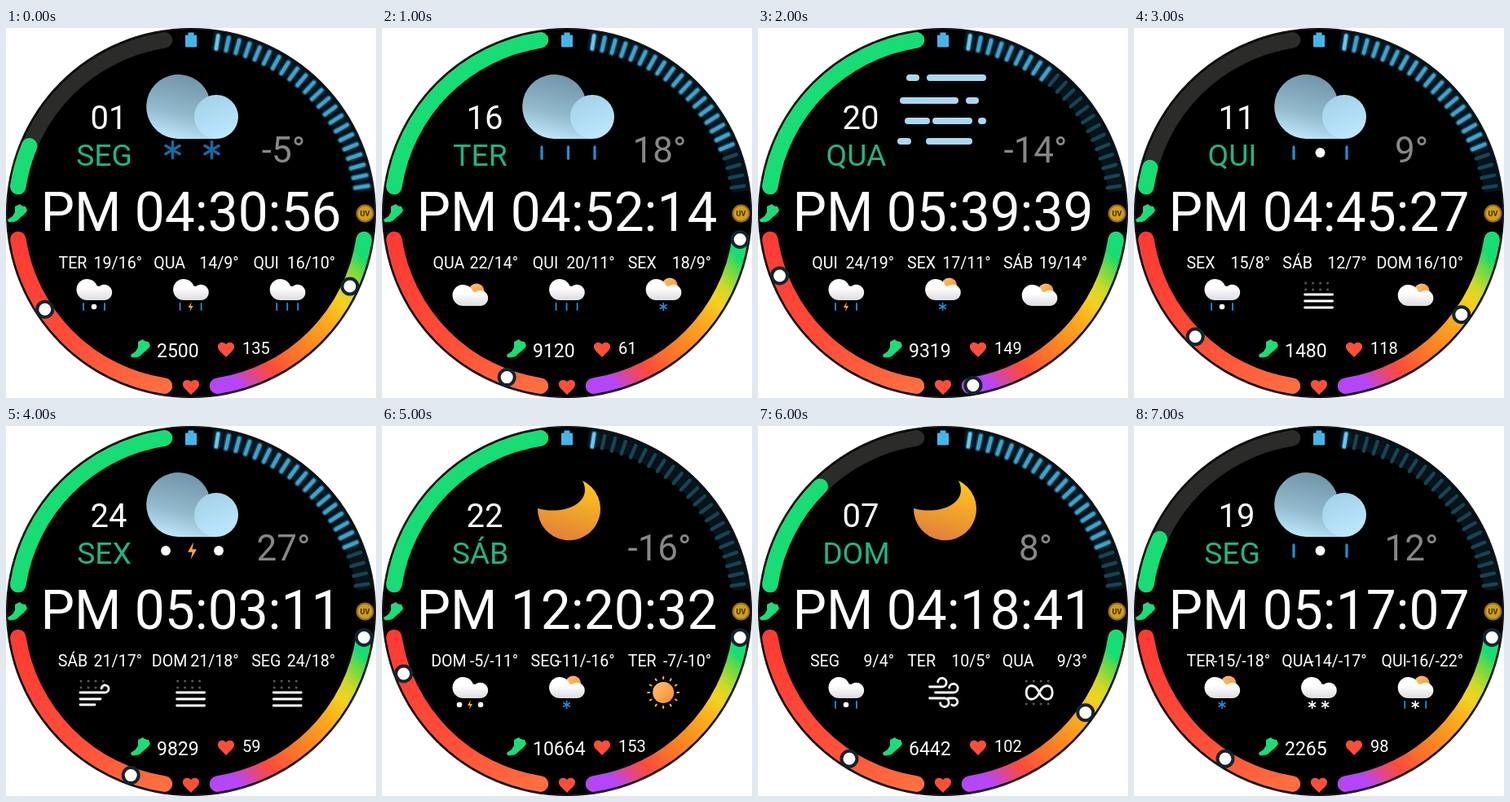
These frames come from a looping animation (454 by 454 pixels, 8 s). An HTML page:

```html
<!DOCTYPE html>
<html lang="pt">
<head>
<meta charset="utf-8">
<style>
  html, body { margin: 0; width: 100%; height: 100%; overflow: hidden; background: #fff; }
  svg { display: block; width: 454px; height: 454px; font-family: Roboto, sans-serif; fill: #fff; }
</style>
</head>
<body>
<svg viewBox="0 0 454 454">
  <defs>
    <linearGradient id="pulse" gradientUnits="userSpaceOnUse" x1="14" y1="259" x2="195" y2="440">
      <stop stop-color="#ff3b33"/><stop offset=".5" stop-color="#ff4c37"/><stop offset="1" stop-color="#ff6f40"/>
    </linearGradient>
    <linearGradient id="uv" gradientUnits="userSpaceOnUse" x1="440" y1="259" x2="259" y2="440">
      <stop offset=".07" stop-color="#16dd74"/><stop offset=".12" stop-color="#5fda48"/>
      <stop offset=".22" stop-color="#d0d928"/><stop offset=".29" stop-color="#f2d21f"/>
      <stop offset=".37" stop-color="#fdb41c"/><stop offset=".52" stop-color="#fa8f21"/>
      <stop offset=".66" stop-color="#fb6a2c"/><stop offset=".76" stop-color="#fb4b3c"/>
      <stop offset=".84" stop-color="#e0468a"/><stop offset=".92" stop-color="#b446f8"/>
    </linearGradient>
    <linearGradient id="cloudBack" x1=".6" y1="0" x2=".35" y2="1">
      <stop stop-color="#7093a8"/><stop offset=".6" stop-color="#92b9cd"/><stop offset="1" stop-color="#bfe8fb"/>
    </linearGradient>
    <linearGradient id="cloudFront" x1=".2" y1="0" x2=".6" y2="1">
      <stop stop-color="#a2d0e6"/><stop offset="1" stop-color="#bce8ff"/>
    </linearGradient>
    <linearGradient id="moon" x1=".7" y1="0" x2=".4" y2="1">
      <stop stop-color="#ffc51c"/><stop offset="1" stop-color="#e0803a"/>
    </linearGradient>
    <linearGradient id="puff" x1="0" y1="0" x2="0" y2="1">
      <stop offset=".4" stop-color="#fff"/><stop offset="1" stop-color="#dcdce3"/>
    </linearGradient>
    <linearGradient id="sun" x1="0" y1="0" x2="1" y2="1">
      <stop stop-color="#ffc56b"/><stop offset="1" stop-color="#f58a35"/>
    </linearGradient>
    <path id="heart" fill="#ff4f38" d="M0 10L-8 2C-14-5-6-12 0-6C6-12 14-5 8 2Z"/>
    <path id="shoe" fill="#1ade78" d="M-12 8L-6 4L-3-1V-8L3-11Q5-8 10-8L12-3C9 2 5 4 1 8Q-3 12-11 11Z"/>
  </defs>
  <circle cx="227" cy="227" r="227" fill="#000"/>
  <circle cx="227" cy="227" r="226" fill="none" stroke="#222"/>
  <g id="face"></g>
</svg>
<script>
const DAYS = ['DOM', 'SEG', 'TER', 'QUA', 'QUI', 'SEX', 'SÁB'];
const GREEN = '#17dd74', BLUE = '#208fd8';
const START = 8.7, END = 81.3, RADIUS = 214.7, TICKS = 22;

// Angles are degrees away from the horizontal axis; precip: l line, . dot, b bolt, s/w snow
const states = [
  {day: 1, date: '01', temp: -5, time: '04:30:56', sky: 'cloud ss', temps: '19/16 14/9 16/10',
   icons: ['cloud l.l', 'cloud lbl', 'cloud lll'], steps: 2500, pulse: 135, goal: 22.5, battery: 22, heart: 33.4, uv: 24.8},
  {day: 2, date: '16', temp: 18, time: '04:52:14', sky: 'cloud lll', temps: '22/14 20/11 18/9',
   icons: ['sunny', 'cloud lll', 'sunny s'], steps: 9120, pulse: 61, goal: END, battery: 18, heart: 69.9, uv: START},
  {day: 3, date: '20', temp: -14, time: '05:39:39', sky: 'fog', temps: '24/19 17/11 19/14',
   icons: ['cloud lbl', 'sunny s', 'sunny'], steps: 9319, pulse: 149, goal: END, battery: 9, heart: 21, uv: 80.1},
  {day: 4, date: '11', temp: 9, time: '04:45:27', sky: 'cloud l.l', temps: '15/8 12/7 16/10',
   icons: ['cloud l.l', 'mist', 'sunny'], steps: 1480, pulse: 118, goal: 15, battery: 18, heart: 45, uv: 35.5},
  {day: 5, date: '24', temp: 27, time: '05:03:11', sky: 'cloud .b.', temps: '21/17 21/18 24/18',
   icons: ['breeze', 'mist', 'mist'], steps: 9829, pulse: 59, goal: END, battery: 18, heart: 69.9, uv: START},
  {day: 6, date: '22', temp: -16, time: '12:20:32', sky: 'moon', temps: '-5/-11 -11/-16 -7/-10',
   icons: ['cloud .b.', 'sunny s', 'sun'], steps: 10664, pulse: 153, goal: END, battery: 1, heart: 21, uv: START},
  {day: 0, date: '07', temp: 8, time: '04:18:41', sky: 'moon', temps: '9/4 10/5 9/3',
   icons: ['cloud l.l', 'wind', 'haze'], steps: 6442, pulse: 102, goal: 45.4, battery: 18, heart: 57.6, uv: 35.5},
  {day: 1, date: '19', temp: 12, time: '05:17:07', sky: 'cloud l.l', temps: '-15/-18 -14/-17 -16/-22',
   icons: ['sunny s', 'cloud ww', 'sunny lwl'], steps: 2265, pulse: 98, goal: 24.3, battery: 1, heart: 57.6, uv: START},
];

const text = (s, x, y, size, anchor = 'middle', fill = '#fff') =>
  `<text x="${x}" y="${y}" font-size="${size}" text-anchor="${anchor}" fill="${fill}">${s}</text>`;
const circle = (x, y, r, fill = '#fff', extra = '') => `<circle cx="${x}" cy="${y}" r="${r}" fill="${fill}" ${extra}/>`;
const line = (d, color, width) =>
  `<path d="${d}" fill="none" stroke="${color}" stroke-width="${width}" stroke-linecap="round"/>`;
const group = (x, y, body, scale = 1) => `<g transform="translate(${x} ${y}) scale(${scale})">${body}</g>`;
const use = (id, x, y) => `<use href="#${id}" x="${x}" y="${y}"/>`;
const polar = (deg, r = RADIUS) => {
  const a = deg * Math.PI / 180;
  return [227 + r * Math.cos(a), 227 + r * Math.sin(a)];
};
const arcPath = (from, to) => `M${polar(from)}A${RADIUS} ${RADIUS} 0 0 1 ${polar(to)}`;
const arc = (from, to, color) => line(arcPath(from, to), color, 19.5);
const marker = deg => circle(...polar(deg), 9.5, '#fff', 'stroke="#14232e" stroke-width="4"');

function battery(level) {
  let out = `<path d="${arcPath(-83, -7)}" fill="none" stroke="#05131a" stroke-width="21"/>`;
  for (let i = 0; i < TICKS; i++) {
    const a = -END + i * (END - START) / (TICKS - 1);
    const d = `M${polar(a, 204)}L${polar(a, 220)}`;
    if (i < level) out += line(d, '#10465e', 7.5);
    out += line(d, i < level ? (i ? '#3fa3ca' : '#62caf2') : '#1a4352', 4.5);
  }
  return out + '<path fill="#45b5e8" d="M223.5 5.5h7v3h2.5q1 0 1 1v13q0 1-1 1h-12q-1 0-1-1v-13q0-1 1-1h2.5z"/>';
}

const flake = color => [0, 60, 120].map(a =>
  `<g transform="rotate(${a})">${line('M0-4.5V4.5', color, 1.6)}</g>`).join('');
const drops = {
  l: line('M0-4V4', BLUE, 1.8),
  '.': circle(0, 0, 3.3),
  b: '<path fill="#ffab2e" d="M1-6L-3 1H0L-1 6L3-1H0Z"/>',
  s: flake(BLUE),
  w: flake('#fff'),
};
const precip = (kinds = '', x, y, gap, scale) => [...kinds].map((k, i) =>
  group(x + (i - (kinds.length - 1) / 2) * gap, y, drops[k], scale)).join('');

const bars = (y, ...spans) => spans.map(([a, b]) => line(`M${a + 4} ${y}H${b - 4}`, '#a9d8f2', 8)).join('');
function sky(name) {
  const [kind, kinds] = name.split(' ');
  if (kind == 'moon')
    return '<path fill="url(#moon)" d="M246 67A38.5 38.5 0 1 1 191 101C222 110 260 95 246 67Z"/>';
  if (kind == 'fog')
    return bars(61, [182, 198], [207, 280]) + bars(89, [174, 246], [255, 271]) +
      bars(114, [180, 211], [214, 263], [270, 280]) + bars(139, [171, 188], [206, 263]);
  const pair = kinds.length == 2;
  return '<path fill="url(#cloudBack)" d="M258 136H212A39.5 39.5 0 1 1 248 81Z"/>' +
    circle(258, 109, 27, 'url(#cloudFront)') +
    `<g opacity="${pair ? .75 : 1}">${precip(kinds, 228.5, pair ? 149.5 : 153, pair ? 48 : 32.5, pair ? 2.2 : 1.8)}</g>`;
}

const puff = '<path fill="url(#puff)" d="M12.5 7H-8.5A13 13 0 1 1 3.7-10.5L6.5-10A9.6 9.6 0 1 1 12.5 7Z"/>';
const dots = y => [-16, -7, 2, 11].map(x => circle(x, y, 1.5, '#5a5a5a')).join('');
const white = d => line(d, '#fff', 2.8);
const icons = {
  cloud: puff,
  sunny: circle(8, -11, 9.5, 'url(#sun)') + puff,
  sun: circle(0, 0, 13, 'url(#sun)') + Array.from({length: 12}, (_, i) =>
    `<g transform="rotate(${i * 30})">${line('M0-17V-19', '#ffb45a', 2)}</g>`).join(''),
  mist: dots(-14) + dots(-6) + white('M-17 0H17M-17 8H17M-17 16H17'),
  breeze: dots(-14) + dots(-6) + white('M-17 0H13A4.5 4.5 0 1 0 9-5M-17 8H8M-17 15H1'),
  wind: white('M-16-7H-1A5.3 5.3 0 1 0-6-13M-9 0H13A5.3 5.3 0 1 0 8-6M-16 7H2A5.3 5.3 0 1 1-3 13M7 7H13A4.5 4.5 0 1 1 11 15'),
  haze: dots(-14) + dots(14) + white('M0 0C-5-11-16-11-16 0S-5 11 0 0S16-11 16 0S5 11 0 0'),
};
function icon(name, x) {
  const [kind, kinds] = name.split(' ');
  const alone = name == 'sunny';
  return group(x, alone ? 334 : 327, icons[kind]) + precip(kinds, x, 342, kinds == 'ww' ? 16 : 13, 1);
}

function draw(s) {
  const forecast = s.temps.split(' ').map((range, i) => {
    const x = 82 + i * 118.6;
    return text(DAYS[(s.day + i + 1) % 7], x, 295, 19.6) +
      text(range + '°', x + 85, 295, 19.6, 'end') + icon(s.icons[i], x + 26);
  }).join('');
  return arc(180 + START, 180 + END, '#2b2b2a') + arc(180 + START, 180 + s.goal, GREEN) +
    arc(90 + START, 90 + END, 'url(#pulse)') + arc(START, END, 'url(#uv)') +
    marker(180 - s.heart) + marker(s.uv) + battery(s.battery) +
    use('shoe', 14, 227) + use('heart', 227, 440) +
    circle(440.5, 227.5, 10, '#d19c20', 'stroke="#94700f" stroke-width="2"') +
    `<g font-weight="700">${text('UV', 440.5, 231, 9, 'middle', '#3d2a06')}</g>` +
    sky(s.sky) + text(s.date, 126, 123.6, 40) + text(DAYS[s.day], 120.5, 169, 37.3, 'middle', '#22b485') +
    text(s.temp + '°', 340.5, 164.8, 44, 'middle', '#878787') + text('PM ' + s.time, 227, 249, 65.8) +
    forecast + use('shoe', 165, 393) + text(s.steps, 185, 404, 23, 'start') +
    use('heart', 270, 394) + text(s.pulse, 290, 400, 20, 'start');
}

const face = document.getElementById('face');
let shown = -1;
function tick() {
  const index = Math.floor(performance.now() / 1000) % states.length;
  if (index != shown) face.innerHTML = draw(states[shown = index]);
  requestAnimationFrame(tick);
}
tick();
</script>
</body>
</html>
```
